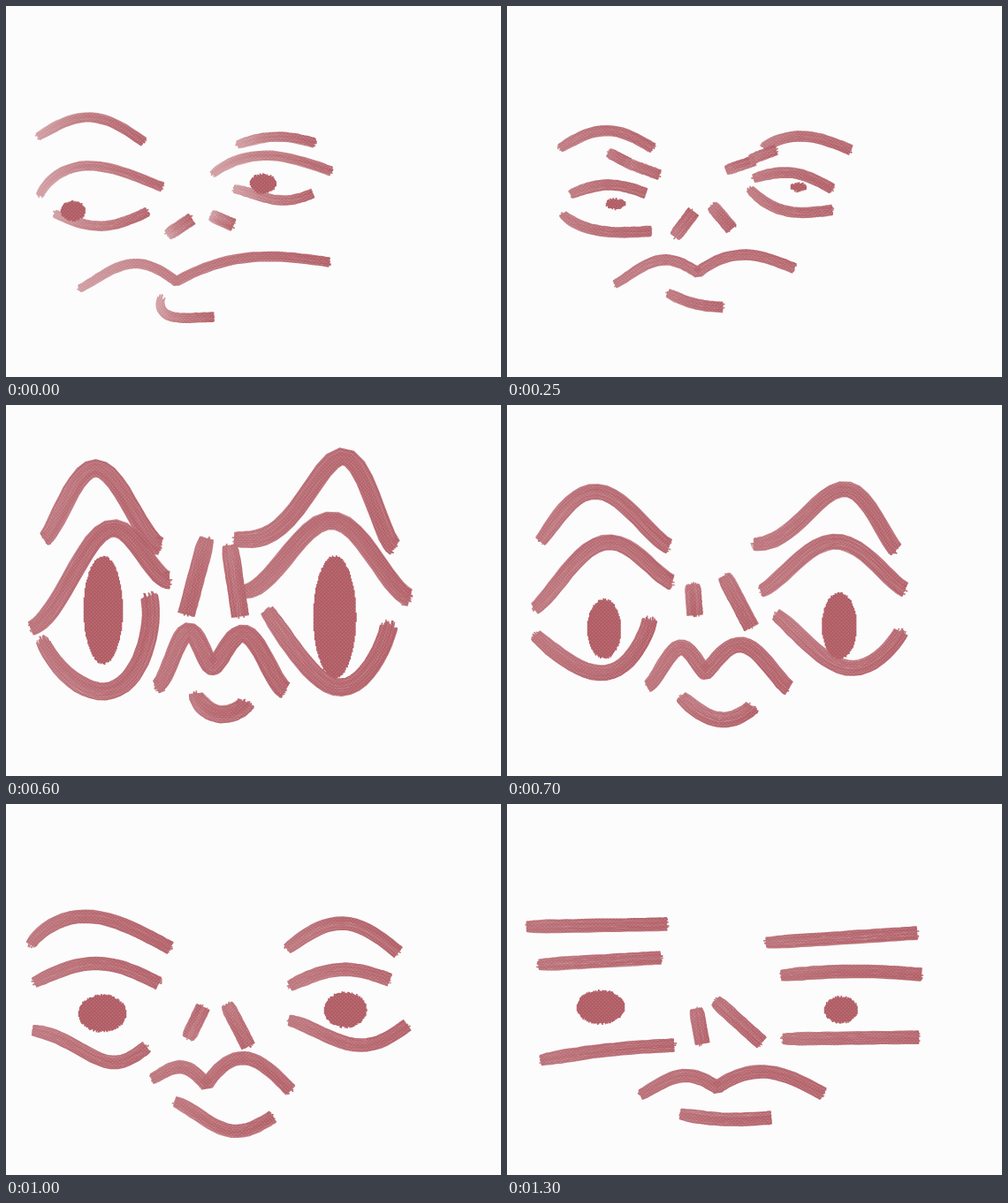
These frames come from a looping animation (560 px wide and 420 px high, 1450 ms). An HTML page with a canvas:

```html
<!DOCTYPE html>
<html lang="en">
<head>
<meta charset="utf-8">
<title>Brushed face</title>
<style>
  html, body { margin: 0; width: 100%; height: 100%; overflow: hidden; background: #fcfcfc; }
  canvas { display: block; width: 560px; height: 420px; }
</style>
</head>
<body>
<canvas id="stage" width="560" height="420"></canvas>
<script>
const STEP = 50, LOOP = 1450, LAST = 26;
const ctx = document.getElementById('stage').getContext('2d');

// An arch runs between two points and rises (or sags) most at "peak" along the way.
const arch = (x0, y0, x1, y1, rise = 0, peak = .5) => [x0, y0, x1, y1, rise, peak];
// A mouth is two arches that meet in a dip.
const mouth = (x0, y0, xm, ym, x1, y1, rise0, rise1) =>
  [arch(x0, y0, xm, ym, rise0, .55), arch(xm, ym, x1, y1, rise1, .45)];
const dot = (x, y, rx, ry) => [x, y, rx, ry];

// bell narrows the upper arches and squares off the lower ones; pale lightens stroke starts.
const poses = [
  { // smirk
    at: 0, weight: 12, bell: 1, pale: .4, ease: 1,
    brow: [arch(36, 148, 156, 154, 25), arch(262, 157, 349, 155, 8)],
    lid: [arch(38, 216, 177, 205, 31, .36), arch(234, 191, 368, 187, 20, .42)],
    low: [arch(55, 235, 160, 233, -15), arch(258, 207, 347, 212, -10, .6)],
    nose: [arch(183, 259, 210, 241), arch(232, 237, 257, 248)],
    mouth: mouth(83, 320, 193, 312, 366, 290, 24, 17),
    chin: arch(176, 329, 235, 352, -17, .25),
    pupil: [dot(76, 232, 14, 11), dot(291, 201, 15, 11)]
  },
  { // frown
    at: 5, weight: 13, bell: 1, pale: .16, ease: 1,
    brow: [arch(60, 161, 165, 161, 20), arch(290, 160, 389, 163, 14, .45)],
    lid: [arch(72, 213, 157, 212, 10), arch(279, 195, 368, 207, 12)],
    low: [arch(63, 235, 163, 255, -11, .4), arch(275, 207, 368, 231, -14, .45)],
    nose: [arch(190, 261, 211, 233), arch(232, 226, 254, 252)],
    mouth: mouth(122, 315, 216, 302, 325, 297, 20, 18),
    chin: arch(182, 325, 244, 341, -4),
    pupil: [dot(123, 224, 11, 6), dot(330, 205, 9, 5)]
  },
  { // squeeze
    at: 8, weight: 15, bell: 1, pale: .12, ease: 1,
    brow: [arch(66, 169, 174, 172), arch(316, 171, 400, 179)],
    lid: [arch(60, 233, 165, 241), arch(268, 209, 371, 215)],
    low: [arch(66, 246, 174, 259, -2), arch(288, 230, 385, 232)],
    nose: [arch(185, 247, 211, 242), arch(235, 232, 246, 259)],
    mouth: mouth(113, 293, 204, 299, 337, 317, 14, 29),
    chin: arch(181, 325, 268, 343, -15, .6),
    pupil: [dot(78, 273, 14, 5), dot(333, 251, 29, 6)]
  },
  { // gape
    at: 12, weight: 21, bell: 1.6, pale: .12, ease: 1.6,
    brow: [arch(43, 152, 175, 160, 84, .45), arch(258, 152, 440, 161, 100, .68)],
    lid: [arch(28, 253, 185, 198, 82, .56), arch(270, 211, 457, 218, 84, .53)],
    low: [arch(40, 264, 161, 214, -85, .42), arch(295, 232, 434, 246, -79, .64)],
    nose: [arch(227, 151, 204, 237), arch(253, 159, 265, 239)],
    mouth: mouth(170, 319, 234, 296, 316, 323, 50, 49),
    chin: arch(215, 326, 272, 336, -19),
    pupil: [dot(110, 232, 22, 61), dot(372, 240, 24, 69)]
  },
  { // doze
    at: 16, weight: 16, bell: 1, pale: .14, ease: 1,
    brow: [arch(32, 157, 192, 160, 34, .42), arch(300, 163, 441, 167, 33, .6)],
    lid: [arch(34, 208, 189, 203, 37, .45), arch(304, 210, 444, 200, 26)],
    low: [arch(24, 256, 162, 269, -23, .7), arch(313, 242, 458, 265, -20, .6)],
    nose: [arch(193, 256, 221, 238), arch(239, 228, 288, 264)],
    mouth: mouth(148, 318, 215, 309, 322, 318, 20, 29),
    chin: arch(179, 334, 283, 346, -21, .62),
    pupil: [dot(110, 275, 16, 6), dot(380, 260, 15, 6)]
  },
  { // stare
    at: 20, weight: 16, bell: 1, pale: .14, ease: 1,
    brow: [arch(28, 160, 186, 163, 34, .4), arch(318, 164, 444, 168, 31)],
    lid: [arch(32, 202, 173, 203, 22), arch(321, 206, 434, 199, 15)],
    low: [arch(30, 256, 159, 275, -23, .7), arch(320, 245, 454, 250, -25, .6)],
    nose: [arch(206, 265, 223, 230), arch(250, 227, 274, 274)],
    mouth: mouth(165, 311, 227, 318, 322, 324, 17, 33),
    chin: arch(191, 337, 302, 354, -23, .6),
    pupil: [dot(109, 237, 27, 21), dot(384, 233, 24, 20)]
  },
  { // deadpan
    at: 26, weight: 16, bell: 1, pale: .1, ease: 1,
    brow: [arch(22, 139, 181, 136), arch(293, 157, 464, 146)],
    lid: [arch(36, 182, 174, 174), arch(310, 194, 469, 193, 4)],
    low: [arch(38, 290, 189, 273, 3), arch(312, 266, 466, 264)],
    nose: [arch(214, 232, 221, 271), arch(236, 223, 288, 270)],
    mouth: mouth(151, 329, 238, 321, 358, 328, 17, 21),
    chin: arch(196, 351, 299, 355, -4),
    pupil: [dot(106, 230, 27, 19), dot(378, 233, 19, 15)]
  }
];

// Creases between the eyes sink while the face tightens.
const creases = [
  { on: 3, line: arch(115, 166, 138, 178) },
  { on: 3, line: arch(134, 177, 172, 191) },
  { on: 3, line: arch(248, 186, 280, 175) },
  { on: 3, line: arch(275, 174, 304, 163) },
  { on: 7, line: arch(266, 211, 291, 223) }
];

const clamp = v => Math.max(0, Math.min(1, v));
const mix = (a, b, k) => Array.isArray(a) ? a.map((v, i) => mix(v, b[i], k)) : a + (b - a) * k;

function blend(a, b, k) {
  const out = {};
  for (const key in a) out[key] = mix(a[key], b[key], k);
  return out;
}

function random(seed) {
  return () => {
    seed = (seed + 0x6D2B79F5) | 0;
    let h = Math.imul(seed ^ seed >>> 15, 1 | seed);
    h = h + Math.imul(h ^ h >>> 7, 61 | h) ^ h;
    return ((h ^ h >>> 14) >>> 0) / 4294967296;
  };
}

const tint = pale => `rgb(${mix([178, 95, 103], [252, 250, 250], pale).map(Math.round)})`;

// Upper arches rise straight up; lower ones sag square to their chord.
function trace([x0, y0, x1, y1, rise, peak], bell, lower, n = 28) {
  const len = Math.hypot(x1 - x0, y1 - y0);
  const nx = lower ? (y1 - y0) / len : 0, ny = lower ? (x0 - x1) / len : -1;
  const skew = Math.log(.5) / Math.log(peak), power = lower ? 1 / bell : bell;
  return Array.from({ length: n + 1 }, (_, i) => {
    const t = (1 - Math.cos(Math.PI * i / n)) / 2;
    const h = rise * Math.max(0, Math.sin(Math.PI * t ** skew)) ** power;
    return [mix(x0, x1, t) + nx * h, mix(y0, y1, t) + ny * h];
  });
}

function brush(pts, w, pale, rnd) {
  const end = pts.length - 1, n = Math.ceil(w / 1.1);
  const g = ctx.createLinearGradient(...pts[0], ...pts[end]);
  g.addColorStop(0, tint(pale));
  g.addColorStop(.35, tint(pale * .45));
  g.addColorStop(1, tint(0));
  ctx.strokeStyle = g;
  const line = pts.map(([x, y], i) => {
    const p = pts[Math.max(0, i - 1)], q = pts[Math.min(end, i + 1)];
    const len = Math.hypot(q[0] - p[0], q[1] - p[1]) || 1;
    return { x, y, dx: (q[0] - p[0]) / len, dy: (q[1] - p[1]) / len };
  });
  for (let b = 0; b < n; b++) {
    const u = (b + .5) / n * 2 - 1;
    const reach = () => (Math.sqrt(1 - u * u) - 1) * w * .35 + (rnd() - .5) * Math.min(7, w * .5);
    const lead = reach(), tail = reach();
    ctx.globalAlpha = mix(.75, 1, rnd());
    ctx.beginPath();
    line.forEach((p, i) => {
      const off = u * (w / 2 - .6) * mix(.75, 1, clamp(i / end * 4)) + (rnd() - .5) * .5;
      const ext = i === 0 ? -lead : i === end ? tail : 0;
      ctx.lineTo(p.x - p.dy * off + p.dx * ext, p.y + p.dx * off + p.dy * ext);
    });
    ctx.stroke();
  }
  ctx.globalAlpha = 1;
}

function blob([x, y, rx, ry], rnd) {
  ctx.strokeStyle = tint(0);
  ctx.beginPath();
  for (let dx = .6 - rx; dx < rx; dx += 1.1) {
    const half = ry * Math.sqrt(1 - (dx / rx) ** 2);
    const ragged = () => half + (rnd() - .5) * 2.5;
    ctx.moveTo(x + dx, y - ragged());
    ctx.lineTo(x + dx, y + ragged());
  }
  ctx.stroke();
}

// Canvas weave showing through the paint
const weave = (() => {
  const tile = document.createElement('canvas');
  tile.width = tile.height = 4;
  const c = tile.getContext('2d');
  c.fillStyle = 'rgba(255,255,255,.14)';
  c.fillRect(0, 0, 1, 1);
  c.fillRect(2, 2, 1, 1);
  return ctx.createPattern(tile, 'repeat');
})();

function draw(step) {
  let i = 0;
  while (i < poses.length - 2 && step >= poses[i + 1].at) i++;
  const from = poses[i], to = poses[i + 1];
  const face = blend(from, to, ((step - from.at) / (to.at - from.at)) ** to.ease);
  const { weight, bell, pale } = face, rnd = random(step * 97);
  const paint = (a, lower, w = weight) => brush(trace(a, bell, lower), w, pale, rnd);

  ctx.clearRect(0, 0, 560, 420);
  ctx.lineJoin = 'round';
  ctx.lineWidth = 1.7;
  for (const side of [0, 1]) {
    paint(face.brow[side]);
    paint(face.lid[side]);
    paint(face.low[side], true);
    paint(face.nose[side], false, 8 + weight * .6);
    blob(face.pupil[side], rnd);
  }
  brush(face.mouth.flatMap(a => trace(a, bell)), weight, pale, rnd);
  paint(face.chin, true);
  const sink = clamp((step - 5) / 3) * 25;
  for (const { on, line: [x0, y0, x1, y1] } of creases) {
    if (step >= on && step < 10) paint(arch(x0, y0 + sink, x1, y1 + sink));
  }

  ctx.globalCompositeOperation = 'source-atop';
  ctx.fillStyle = weave;
  ctx.fillRect(0, 0, 560, 420);
  ctx.globalCompositeOperation = 'source-over';
}

const start = performance.now();
let shown = -1;
function tick() {
  const t = (performance.now() - start) % LOOP;
  const step = Math.min(LAST, Math.floor(t / STEP));
  if (step !== shown) draw(shown = step);
  requestAnimationFrame(tick);
}
tick();
</script>
</body>
</html>
```
